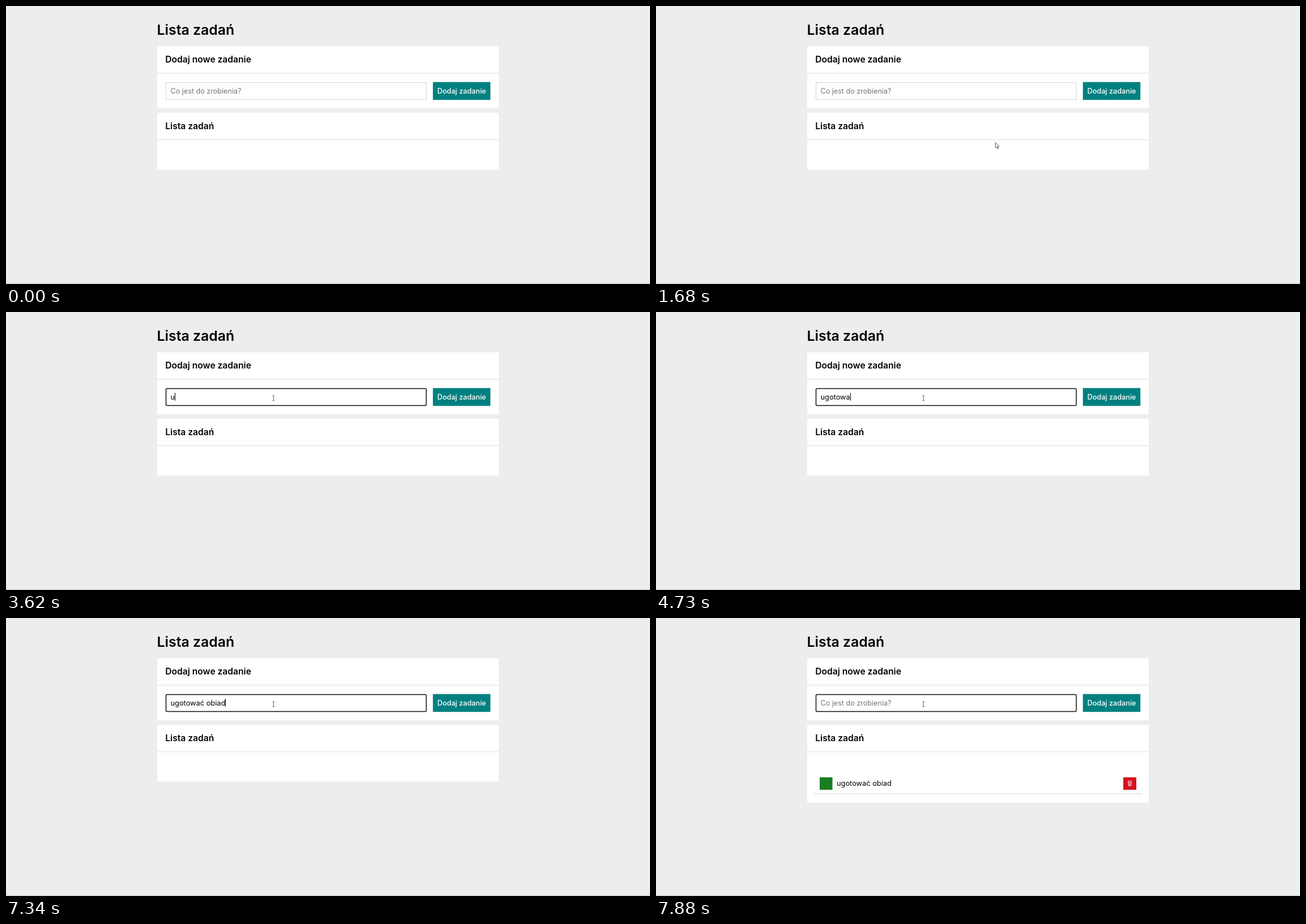
An HTML page that plays this animation: 1137x492 px, repeating every 8 s.

```html
<!DOCTYPE html>
<html lang="pl">
<head>
<meta charset="utf-8">
<title>Lista zadań</title>
<style>
  html, body { margin: 0; width: 100%; height: 100%; overflow: hidden; background: #ebedee; }
  svg { display: block; }
  text { font-family: Inter, "Open Sans", sans-serif; white-space: pre; }
  .title { font-size: 24.8px; font-weight: 600; }
  .heading { font-size: 15.6px; font-weight: 600; }
  .body { font-size: 12.8px; }
  .hint { font-size: 12.6px; fill: #757575; }
  .button { font-size: 12.7px; font-weight: 500; fill: #fff; }
  .panel { fill: #fff; }
</style>
</head>
<body>
<svg width="1137" height="492" viewBox="0 0 1137 492">
  <rect width="1137" height="492" fill="#ebedee"/>
  <rect y="491" width="1137" height="1" fill="#bfc1c2"/>
  <text class="title" x="266.5" y="50.5">Lista zadań</text>

  <rect class="panel" x="267" y="71.3" width="603" height="46.7"/>
  <rect class="panel" x="267" y="120" width="603" height="61"/>
  <text class="heading" x="281.3" y="100.3">Dodaj nowe zadanie</text>

  <rect id="field" x="282.5" y="135.5" width="459.5" height="30" fill="#fff"/>
  <text class="hint" id="hint" x="290.5" y="154.5">Co jest do zrobienia?</text>
  <text class="body" id="typed" x="290.5" y="154.5"></text>
  <rect id="caret" y="143" width="1" height="14"/>
  <rect x="753.7" y="134.6" width="101.5" height="31.6" fill="#008080"/>
  <text class="button" x="761.5" y="154.5">Dodaj zadanie</text>

  <rect class="panel" x="267" y="189" width="603" height="46.5"/>
  <rect class="panel" id="list" x="267" y="237.5" width="603"/>
  <text class="heading" x="281.3" y="217.6">Lista zadań</text>

  <g id="task">
    <rect x="289" y="282" width="22.5" height="22" fill="#1b7d21"/>
    <text class="body" x="319" y="297">ugotować obiad</text>
    <rect x="825" y="282" width="23" height="22" fill="#d5121f"/>
    <g fill="none" stroke="#fff" stroke-width=".8">
      <ellipse cx="836.5" cy="289.3" rx="3.2" ry="1.1"/>
      <path d="M833.5 290l.8 7h4.4l.8-7M835.5 291.5v4.5M837.5 291.5v4.5"/>
    </g>
    <rect x="278" y="310.5" width="581" height="1.3" fill="#ddd"/>
  </g>

  <circle id="ring" cx="471" cy="152" r="9.3" fill="#fbfb78"/>
  <path id="arrow" d="M.5.5v9.6l2.2-2 1.6 3.5 1.5-.7-1.6-3.3h2.9z" fill="#fff" stroke="#333" stroke-width=".8"/>
  <path id="beam" d="M-2-4.5h1.5l.5.5.5-.5h1.5M0-4v8M-2 4.5h1.5l.5-.5.5.5h1.5" fill="none" stroke="#444" stroke-width=".9"/>
</svg>
<script>
const LOOP = 8000;
const ENTER = 440, MOVE = 910, ARRIVE = 2070;
const CLICK = 2370, FOCUS = 2470, RELEASE = 2530, SUBMIT = 7570;
const TASK = "ugotować obiad";

// Typing comes in two equal bursts with a short pause between them.
const BURSTS = [3620, 5130], BURST_LENGTH = 7, KEY_GAP = 185;
const BLINK = 546;

// Cubic Bézier of the pointer, sampled in even steps.
const PATH_X = [1123, 1022, 428, 472.3], PATH_Y = [480, 588, 107, 152.5];
const MOVE_STEPS = 15;

const $ = id => document.getElementById(id);
const show = (id, on) => $(id).setAttribute("visibility", on ? "visible" : "hidden");
const set = (id, attrs) => {
  for (const name in attrs) $(id).setAttribute(name, attrs[name]);
};
const clamp = (v, low, high) => Math.min(high, Math.max(low, v));
const bezier = ([a, b, c, d], u) => {
  const v = 1 - u;
  return v * v * v * a + 3 * u * v * v * b + 3 * u * u * v * c + u * u * u * d;
};

function typing(t) {
  let count = 0, lastInput = CLICK;
  for (const start of BURSTS) {
    const keys = clamp(Math.floor((t - start) / KEY_GAP) + 1, 0, BURST_LENGTH);
    if (keys) lastInput = start + (keys - 1) * KEY_GAP;
    count += keys;
  }
  return { count: t < SUBMIT ? count : 0, lastInput };
}

function drawField(t) {
  const focused = t >= FOCUS;
  set("field", {
    rx: focused ? 1.5 : 0,
    stroke: focused ? "#101010" : "#dcdcdc",
    "stroke-width": focused ? 1.5 : 1.3
  });

  const { count, lastInput } = typing(t);
  $("typed").textContent = TASK.slice(0, count);
  show("hint", !count);
  const end = count ? 290.5 + $("typed").getComputedTextLength() : 291;
  set("caret", { x: Math.round(end) });
  show("caret", focused && Math.floor((t - lastInput) / BLINK) % 2 === 0);
}

function drawPointer(t) {
  const progress = clamp((t - MOVE) / (ARRIVE - MOVE), 0, 1);
  const u = Math.floor(progress * MOVE_STEPS + 0.05) / MOVE_STEPS;
  const x = bezier(PATH_X, u), y = bezier(PATH_Y, u);
  const overField = x > 282 && x < 742 && y > 135 && y < 166;
  for (const id of ["arrow", "beam"]) set(id, { transform: `translate(${x} ${y})` });
  show("arrow", t >= ENTER && !overField);
  show("beam", overField);
  show("ring", t >= CLICK && t < RELEASE);
}

function draw() {
  const t = performance.now() % LOOP;
  drawField(t);
  drawPointer(t);
  show("task", t >= SUBMIT);
  set("list", { height: t >= SUBMIT ? 89 : 52 });
  requestAnimationFrame(draw);
}
draw();
</script>
</body>
</html>
```
